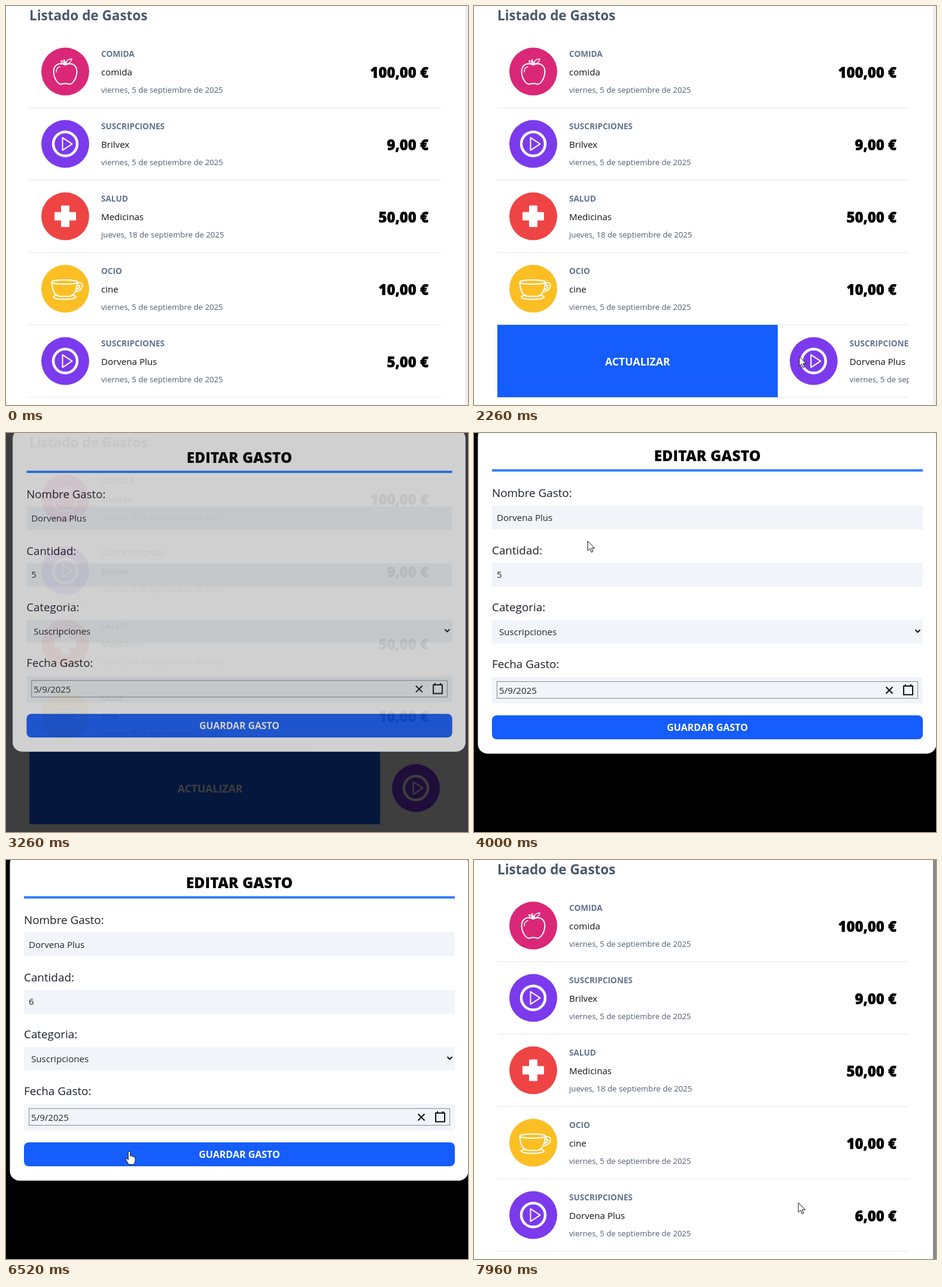
Recreate the animation shown at these times as an HTML page. Size 772x667 px, loop 8000 ms.

```html
<!DOCTYPE html>
<html lang="es">
<head>
<meta charset="utf-8">
<title>Listado de Gastos</title>
<style>
  html, body { margin: 0; width: 100%; height: 100%; overflow: hidden; background: #fff; }
  svg { display: block; width: 100vw; height: 100vh; font-family: "Open Sans", "Noto Sans", sans-serif; }
  .h { font: 700 22.5px "Open Sans", sans-serif; fill: #4a586b; }
  .cat { font-size: 13.6px; font-weight: 700; fill: #62748e; }
  .name { font-size: 15.1px; fill: #111; }
  .date { font-size: 13.2px; fill: #4f5d72; }
  .sum { font-size: 23.9px; font-weight: 800; text-anchor: end; stroke: #000; stroke-width: .5px; }
  .mid { text-anchor: middle; }
  .act { font-size: 17.7px; font-weight: 700; fill: #fff; }
  .title { font-size: 24.7px; font-weight: 800; }
  .label { font-size: 18.85px; fill: #1b1f27; }
  .val { font-size: 15.1px; fill: #22262d; }
  .save { font-size: 16px; font-weight: 700; fill: #fff; }
  .line { fill: none; stroke: #fff; stroke-linecap: round; stroke-linejoin: round; }
  .dark { fill: none; stroke: #111; stroke-width: 2; }
</style>
</head>
<body>
<svg id="stage" viewBox="0 0 772 667"></svg>
<script>
const LOOP = 8000, ROW = 121;
const DRAG = 1820, DROP = 2580, OPEN = 3140, FOCUS = 4060, BLUR = 6400, CLOSE = 6540;

const icons = {
  apple: ['#db2777', `<g class="line" stroke-width="2">
    <path d="M0-11C-9-16-19-12-19.5 0C-19 12-12 22-6 21Q0 19 6 21C12 22 19 12 19.5 0C19-12 9-16 0-11Q0-16-2-20"/>
    <path stroke-width="1.5" d="M1-13Q2-21 11-21Q9-13 1-13M-1-13Q-7-13-7-18Q-3-18-1-13M-15 1Q-15-7-9-8"/></g>`],
  play: ['#7c3aed', `<circle class="line" r="20" stroke-width="4.5"/>
    <path class="line" stroke-width="2" d="M-4.5-10.5V10.5L11.5 0Z"/>`],
  cross: ['#ef4444', `<path fill="#fff" stroke="#fff" stroke-width="2" stroke-linejoin="round"
    d="M-6-17H6V-6H17V6H6V17H-6V6H-17V-6H-6Z"/>`],
  cup: ['#fbbf24', `<g class="line" stroke-width="2">
    <ellipse cx="-1" cy="-11" rx="21.5" ry="3.5"/>
    <path d="M-22.5-11C-22 3-17 12-9 13H6C14 12 19 3 20.5-11M20-9C30-14 31-2 25 2Q21 5 17 5M19-4Q25-8 24-3Q23 0 19 1"/>
    <path d="M-12 11Q-21 12-20 14Q-17 18-1 18Q15 18 18 14Q19 12 10 11"/></g>`]
};

const day5 = 'viernes, 5 de septiembre de 2025';
const rows = [
  ['apple', 'COMIDA', 'comida', day5, '100,00 €'],
  ['play', 'SUSCRIPCIONES', 'Brilvex', day5, '9,00 €'],
  ['cross', 'SALUD', 'Medicinas', 'jueves, 18 de septiembre de 2025', '50,00 €'],
  ['cup', 'OCIO', 'cine', day5, '10,00 €'],
  ['play', 'SUSCRIPCIONES', 'Dorvena Plus', day5, '5,00 €']
];

const text = (cls, x, y, s, id = '') => `<text class="${cls}" x="${x}" y="${y}" id="${id}">${s}</text>`;
const rect = (x, y, w, h, fill, more = '') =>
  `<rect x="${x}" y="${y}" width="${w}" height="${h}" fill="${fill}" ${more}/>`;
const field = (y, h) => rect(30, y, 720, h, '#f1f5f9');

function row([icon, cat, name, date, sum], i) {
  const [color, art] = icons[icon], last = i === 4;
  return `<g transform="translate(0 ${i * ROW})">
    <g id="${last ? 'item' : ''}">
      <g transform="translate(99 109.6)"><circle r="40" fill="${color}"/>${art}</g>
      ${text('cat', 159, 85, cat)}${text('name', 159, 116, name)}
      ${text('date', 159, 145, date)}${text('sum', 706, 120, sum, last ? 'price' : '')}
    </g>${rect(39, 169.5, 688, 1, '#e2e5ea')}</g>`;
}

const list = `${rect(0, 0, 772, 667, '#fff')}${rect(767, 0, 5, 667, '#eeeef2', 'id="bar"')}
  ${text('h', 39, 24, 'Listado de Gastos')}
  <g clip-path="url(#card)">${rows.map(row).join('')}
    ${rect(39, 533, 0, 121, '#155dfc', 'id="swipe"')}${text('mid act', 39, 601, 'ACTUALIZAR', 'update')}</g>`;

const modal = `${rect(6.5, -10, 766, 546, '#fff', 'rx="16"')}
  ${text('mid title', 390, 47, '', 'title')}${rect(30, 60.5, 720, 4, '#2b7fff')}
  ${text('label', 30, 107, 'Nombre Gasto:')}${field(121, 40)}${text('val', 38, 146.5, '', 'name')}
  ${text('label', 30, 203, 'Cantidad:')}${field(217, 40)}
  <g id="focus">${rect(30, 217, 720, 40, 'none', 'rx="3" stroke="#101318" stroke-width="2"')}
    ${rect(727, 223, 15, 28, '#fafafa')}
    <path fill="#858585" d="M729 233h10l-5-7zM729 240h10l-5 7z"/></g>
  ${text('val', 38, 242, '', 'amount')}${rect(46.5, 227, 1.2, 19, '#000', 'id="caret"')}
  ${text('label', 30, 298, 'Categoria:')}${field(313, 38.5)}${text('val', 42, 338, '', 'kind')}
  <path class="dark" d="M737.5 329l4 4 4-4"/>
  ${text('label', 30, 393, 'Fecha Gasto:')}${field(408, 44)}
  ${rect(38.5, 415.5, 703, 28, 'none', 'stroke="#858a91"')}${text('val', 42, 436, '5/9/2025')}
  <path class="dark" d="M688.5 424.5l11 11m0-11l-11 11M718 423h15v14.5h-15zM721 420v3m9-3v3"/>
  ${rect(30, 472, 720, 40, '#155dfc', 'rx="8"')}${text('mid save', 390, 498, '', 'save')}`;

const pointers = `<g id="cursor" stroke="#111" stroke-linejoin="round" fill="#fff">
  <path id="arrow" d="M0 0V16L3.7 12.6L6.2 18.6L8.8 17.5L6.3 11.7H11.5Z"/>
  <path id="beam" fill="none" d="M-3-8Q0-8 0-6Q0-8 3-8M0-6V6M-3 8Q0 8 0 6Q0 8 3 8"/>
  <path id="hand" d="M-1.8 1.5Q0-1.5 1.8 1.5V8Q4 6.5 5 8.5Q7 7.5 7.8 9.5Q10 9 10 11.5V16Q9 19 8 22H-1Q-3 18-6 14Q-6.5 11-4 12L-1.8 14Z"/></g>`;

const stage = document.getElementById('stage');
stage.innerHTML = `<clipPath id="card">${rect(39, 0, 688, 667, '#000')}</clipPath>${list}
  ${rect(0, 0, 772, 667, '#000', 'id="shade"')}<g id="modal">${modal}</g>${pointers}`;

const $ = id => document.getElementById(id);
const set = (id, attrs) => { for (const k in attrs) $(id).setAttribute(k, attrs[k]); };
const write = (id, s) => { if ($(id).textContent !== s) $(id).textContent = s; };
const show = (id, on) => set(id, { visibility: on ? 'visible' : 'hidden' });
const within = (t, a, b) => t >= a && t < b;
const ratio = (t, a, b) => Math.min(1, Math.max(0, (t - a) / (b - a)));
const mix = (a, b, k) => a + (b - a) * k;

// CSS cubic-bezier timing
function bezier(x1, y1, x2, y2, x) {
  const at = (a, b, u) => 3 * (1 - u) ** 2 * u * a + 3 * (1 - u) * u * u * b + u ** 3;
  let lo = 0, hi = 1;
  for (let i = 0; i < 24; i++) {
    const m = (lo + hi) / 2;
    if (at(x1, x2, m) < x) lo = m; else hi = m;
  }
  return at(y1, y2, lo);
}

// start, arrival, end, from x, y, to x, y
const moves = [
  [600, 1080, 1220, 330, 670, 105, 578],
  [1220, 1420, DROP, 105, 578, 75, 586],
  [DROP, 2840, 2840, 661, 586, 690, 690],
  [3980, 4300, 4480, 190, 180, 190, 238],
  [5760, 6300, 6760, 190, 240, 206, 487],
  [6760, 7960, LOOP, 206, 487, 542, 573]
];

function moveCursor(t, offset) {
  const m = moves.find(m => within(t, m[0], m[2]));
  let shape = '';
  if (m) {
    const [start, arrive, , x0, y0, x1, y1] = m;
    const u = ratio(t, start, arrive), k = u * u * (3 - 2 * u);
    const x = mix(x0, x1, k) + (t < DROP ? offset : 0), y = mix(y0, y1, k);
    set('cursor', { transform: `translate(${x} ${y})` });
    shape = 'arrow';
    if (within(t, 3900, 6760)) {
      if (within(y, 217, 257)) shape = 'beam';
      if (y > 472) shape = 'hand';
    }
  }
  for (const id of ['arrow', 'beam', 'hand']) show(id, id === shape);
}

function render(t) {
  const closing = t >= CLOSE;

  const offset = within(t, DRAG, 5000) ? 586 * (1 - (1 - ratio(t, DRAG, DROP)) ** 1.852) : 0;
  set('item', { transform: `translate(${offset} 0)` });
  set('swipe', { width: offset });
  set('update', { x: 39 + offset / 2 + Math.max(0, offset - 468) / 13 });
  show('update', offset > 0);
  write('price', t < 5000 ? '5,00 €' : '6,00 €');
  set('bar', { fill: closing ? '#8b8b8b' : '#eeeef2' });

  const p = closing
    ? 1 - bezier(.4, 0, 1, 1, ratio(t, CLOSE, CLOSE + 200))
    : bezier(0, 0, .2, 1, ratio(t, OPEN, OPEN + 300));
  set('shade', { opacity: p });
  set('modal', {
    opacity: p,
    transform: `translate(${closing ? 383 : 390} 263) scale(${.95 + .05 * p}) translate(-390 -263)`
  });

  write('title', closing ? 'NUEVO GASTO' : 'EDITAR GASTO');
  write('name', closing ? 'Añade el nombre del Gasto' : 'Dorvena Plus');
  $('name').style.fill = closing ? '#757575' : '';
  write('kind', closing ? '-- Seleccione --' : 'Suscripciones');
  write('save', closing ? 'REGISTRAR GASTO' : 'GUARDAR GASTO');
  const amount = closing ? '0' : t < 4480 ? '5' : t < 4620 ? '' : '6';
  write('amount', amount);
  show('focus', within(t, FOCUS, BLUR));
  show('caret', within(t, FOCUS, 4700) || within(t, 5620, 6150));
  set('caret', { x: amount ? 46.5 : 38.5 });

  moveCursor(t, offset);
}

const begin = performance.now();
function tick() {
  render((performance.now() - begin) % LOOP);
  requestAnimationFrame(tick);
}
tick();
</script>
</body>
</html>
```
